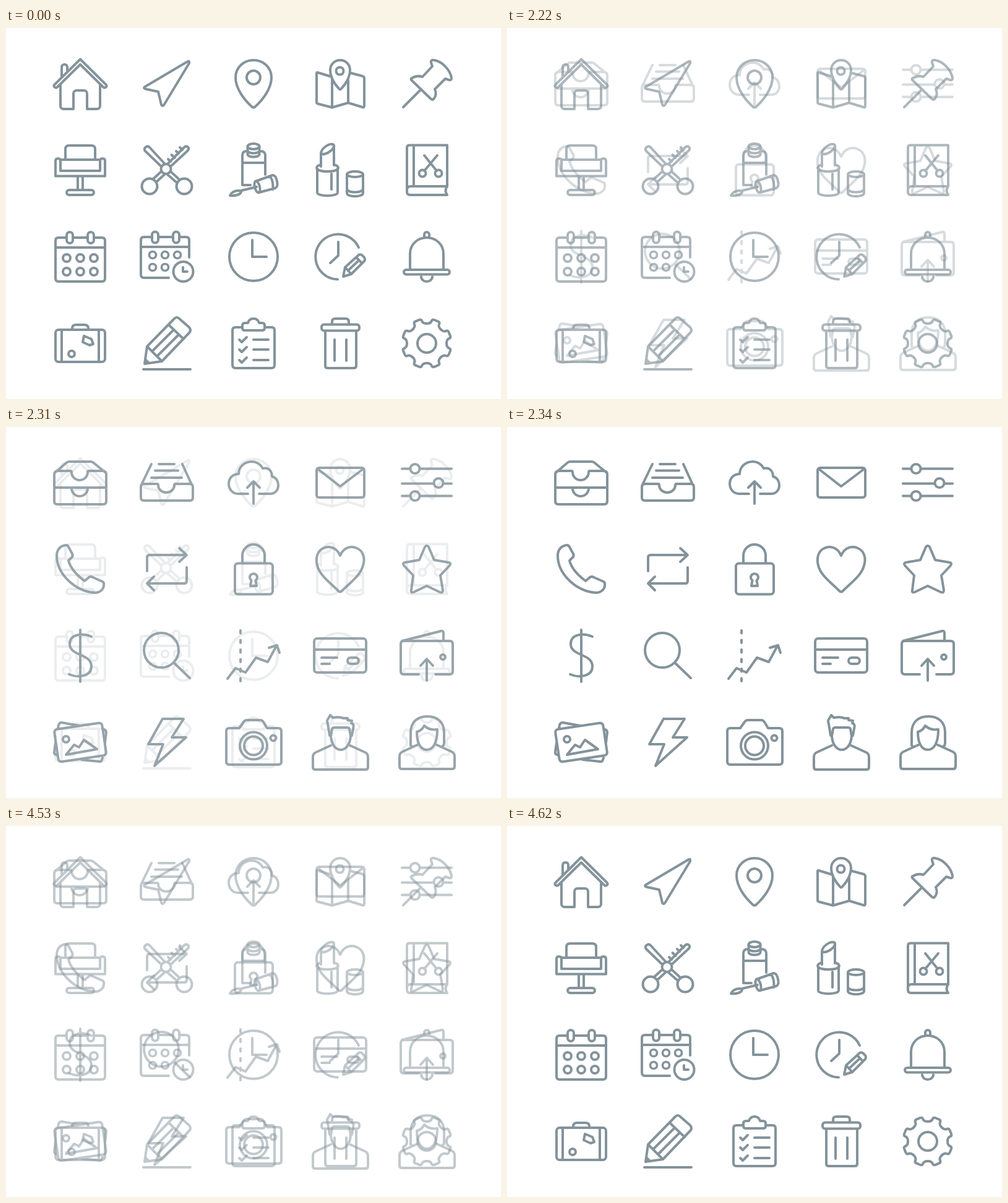
Animation, 800 px wide and 600 px high, one loop 4800 ms. Source, as an HTML page without scripts:

```html
<!DOCTYPE html>
<html lang="en">
<head>
<meta charset="utf-8">
<title>Line icons</title>
<style>
html, body { margin: 0; width: 100%; height: 100%; overflow: hidden; background: #fff; }
svg { display: block; width: 100%; height: 100%; fill: none; stroke: #84939b; stroke-width: 4; stroke-linecap: round; stroke-linejoin: round; }
.set { animation: fade-out 4.8s infinite; }
.alt { animation-name: fade-in; }
/* each crossfade runs in six hard steps of 30 ms */
@keyframes fade-out {
  0% { opacity: 1; animation-timing-function: step-end; }
  45.6% { opacity: 1; animation-timing-function: steps(6, start); }
  49.35% { opacity: 0; animation-timing-function: step-end; }
  93.1% { opacity: 0; animation-timing-function: steps(6, start); }
  96.85%, 100% { opacity: 1; }
}
@keyframes fade-in {
  0% { opacity: 0; animation-timing-function: step-end; }
  45.6% { opacity: 0; animation-timing-function: steps(6, start); }
  49.35% { opacity: 1; animation-timing-function: step-end; }
  93.1% { opacity: 1; animation-timing-function: steps(6, start); }
  96.85%, 100% { opacity: 0; }
}
</style>
</head>
<body>
<svg viewBox="0 0 800 600">
<defs>
  <circle id="day" r="6"/>
  <circle id="knob" r="7.5"/>
  <rect id="ring" x="-5" y="-9" width="10" height="18" rx="5"/>
  <path id="task" d="M377 504l4 4 8-8M400 504h24"/>
  <path id="tooth" d="M0-32C4.5-32 7-33.5 8-36.5Q9-39 12-38L18.4-35.4Q21.2-33.9 20.2-31.5C18.7-28.6 19.4-25.8 22.6-22.6"/>
  <path id="bust" d="M525 515L501 526Q496 528 496 534V550q0 4 4 4H581q4 0 4-4V534q0-6-5-8L556 515"/>
</defs>

<g class="set">
  <!-- house -->
  <path d="M120 50.5L161.5 91.5Q164 94 161 96Q159 97.500 156.500 95L120 59L83.500 95Q81 97.500 79 96Q76 94 78.500 91.500Z"/>
  <path d="M88 92V126a5 5 0 0 0 5 5H109V106a5 5 0 0 1 5-5H126a5 5 0 0 1 5 5V131H147a5 5 0 0 0 5-5V92M90 79V63a4 4 0 0 1 4-4h1a4 4 0 0 1 4 4V69"/>
  <!-- arrow -->
  <path d="M293 54.5L224.5 95Q221.5 97 225 98.5L246 103L251 124Q253 128 255.5 124L296 57Q297 52 293 54.5Z"/>
  <!-- pin -->
  <path d="M400 52C416 52 429 64 429 80C429 98 415 116 403 127Q400 130 397 127C385 116 371 98 371 80C371 64 384 52 400 52Z"/>
  <circle cx="400" cy="80" r="11"/>
  <!-- map -->
  <path d="M540 52C549 52 556 59 556 68C556 79 549 91 542 98Q540 101 538 98C531 91 524 79 524 68C524 59 531 52 540 52Z"/>
  <circle cx="539.500" cy="69.500" r="6"/>
  <path d="M525 78.500L504 72Q502 71 502 73V120Q502 122 504 122.500L527 128.500L553 121L576 128Q579 129 579 126V81Q579 79 577 78L558 73M527 81V128M553 84V121"/>
  <!-- pushpin -->
  <path d="M642 128L671 99M687 56Q686 51 692 52C705 54 718 68 720 81Q720 85 716 84L710 82L693 99Q697 108 691 115Q689 117 686 114L656 85Q653 82 656 81Q664 76 673 79L689 62Z"/>
  <!-- chair -->
  <path d="M80 239.500H160V215q0-4-4-4q-4 0-4 4V231H88V215q0-4-4-4q-4 0-4 4ZM88 213H152M96 213V196q0-6 6-6H138q6 0 6 6V213M116 240V262M124 240V262"/>
  <rect x="98" y="262" width="44" height="8" rx="4"/>
  <!-- scissors and comb -->
  <circle cx="232" cy="256" r="12.500"/><circle cx="288" cy="256" r="12.500"/><circle cx="258.500" cy="228" r="8"/>
  <path d="M251 224L225 199Q222 195 226 192.500Q229 190 232 193L256 219M266 224L293 199Q297 195 294 192.500Q291 190 288 193L262 219"/>
  <path d="M251 232L238 244M256 237L243 249M266 232L280 245M261 237L276 250M266 216l-4-4M272.500 210l-5-5M279 203l-4-4M285 197l-4-4"/>
  <!-- nail polish -->
  <ellipse cx="400" cy="191.500" rx="9.500" ry="4.500"/>
  <path d="M390.500 192V204c0 6 19 6 19 0V192M390.500 198c0 6 19 6 19 0M390 199q-8 0-8 7V254H395M410 199q9 0 9 7V237M382 218H419"/>
  <path d="M362 271Q366 263 376 263Q382 263 379 267Q374 272 362 271ZM380 263L405 257M403 248L431 238q5 0 7 10q2 9-3 11L409 266M427 240q6 9 4 21"/>
  <ellipse cx="406" cy="257" rx="4" ry="9.500" transform="rotate(-15 406 257)"/>
  <!-- lipstick -->
  <path d="M509 224V203C509 195 522 186 528 188Q531 189 530 194V222M510 204C518 205 530 197 530 190M503 228V266c0 7 33 7 33 0V228M526 236V261"/>
  <path d="M509 221C501 223 501 227 504 229C510 233 529 233 535 229C538 227 538 223 530 221"/>
  <ellipse cx="564" cy="236.500" rx="13" ry="4.500"/>
  <path d="M551 237V267c0 7 26 7 26 0V237M551 261c3 6 23 6 26 0"/>
  <!-- book -->
  <path d="M713 256V189.500H652q-4 0-4 4V265q0 5 5 5H713q-5-7 0-14H654q-6 0-6 6M659 190V255M676 206L696 231M697 206L676 231"/>
  <circle cx="673" cy="235" r="5.500"/><circle cx="699" cy="235" r="5.500"/>
  <!-- calendar -->
  <path d="M98 339H85q-5 0-5 5V405q0 5 5 5H155q5 0 5-5V344q0-5-5-5H142M108 339H132M80 355H160"/>
  <use href="#ring" x="103" y="339"/><use href="#ring" x="137" y="339"/>
  <use href="#day" x="98" y="372"/><use href="#day" x="120" y="372"/><use href="#day" x="142" y="372"/>
  <use href="#day" x="98" y="394"/><use href="#day" x="120" y="394"/><use href="#day" x="142" y="394"/>
  <!-- calendar with clock -->
  <path d="M236 338H223q-5 0-5 5V399q0 5 5 5H263M296 371V343q0-5-5-5H280M246 338H270M218 354H296M286 387V394H293"/>
  <use href="#ring" x="241" y="338.500"/><use href="#ring" x="275" y="338.500"/>
  <g id="days"><use href="#day" transform="translate(237 367) scale(.92)"/><use href="#day" transform="translate(257 367) scale(.92)"/></g>
  <use href="#days" y="20"/><use href="#day" transform="translate(277 367) scale(.92)"/>
  <circle cx="286.500" cy="394" r="16"/>
  <!-- clock -->
  <circle cx="400" cy="370" r="39"/><path d="M398 343V370H421"/>
  <!-- clock with pencil -->
  <path d="M536 406.500A36.500 36.500 0 1 1 570 355M537 346V368L524 380"/>
  <path d="M545 402L548 387L570 367q3-2 6 1l3 3q2 3 0 6L558 398ZM548 387L558 398M566 371L575 380M553 392L570 376"/>
  <!-- bell -->
  <path d="M653 391V365C653 350 665 339 680 339C695 339 707 350 707 365V391M676 339V334a4 4 0 0 1 8 0V339M671 402a9 8 0 0 0 18 0"/>
  <rect x="643" y="391" width="74" height="7.500" rx="3.700"/>
  <!-- suitcase -->
  <rect x="80" y="488" width="80" height="52" rx="5"/>
  <path d="M107 487V486q0-6 6-6H127q6 0 6 6V487M90 488V540M150 488V540M126 498L138 503L141 511L135 513L124 508Z"/>
  <circle cx="106" cy="527" r="5"/>
  <!-- pencil -->
  <path d="M222 552H298M224 543L228 515L272 470q4-4 8 0L296 484q4 5 0 9L252 539ZM228 515L252 539M263 480L287 503M236 523L271 488M244 531L279 496M225 536L231 542"/>
  <!-- clipboard -->
  <path d="M381 484H371q-5 0-5 5V545q0 5 5 5H429q5 0 5-5V489q0-5-5-5H419M382 485V481q0-4 4-4H391q2-7 9-7q7 0 9 7H414q4 0 4 4V485q0 4-4 4H386q-4 0-4-4Z"/>
  <use href="#task"/><use href="#task" y="16"/><use href="#task" y="33"/>
  <!-- bin -->
  <rect x="510" y="479.500" width="61" height="10" rx="4"/>
  <path d="M527 479V475q0-5 5-5H549q5 0 5 5V479M516 490V546q0 4 4 4H562q4 0 4-4V490M531 504V538M550 504V538"/>
  <!-- gear -->
  <g transform="translate(680 510)">
    <circle r="15"/>
    <g id="quarter"><use href="#tooth"/><use href="#tooth" transform="rotate(45)"/></g>
    <use href="#quarter" transform="rotate(90)"/><use href="#quarter" transform="rotate(180)"/><use href="#quarter" transform="rotate(270)"/>
  </g>
</g>

<g class="set alt">
  <!-- drawers -->
  <path d="M80 73L98 57.500q2-1.500 4-1.500H137q2 0 4 1.500L160 73M78 77q0-6 6-6H104q2 0 2 2a13 13 0 0 0 26 0q0-2 2-2H156q6 0 6 6V120q0 5-5 5H83q-5 0-5-5ZM78 98H162M106 99a13 13 0 0 0 26 0"/>
  <!-- inbox -->
  <path d="M235 60L219 93M285 60L300 93M247 60H272M241 70.500H278M235 82H284M223 92H244q2 0 2 2a13 12 0 0 0 26 0q0-2 2-2H297q5 0 5 5V114q0 5-5 5H223q-5 0-5-5V97q0-5 5-5Z"/>
  <!-- cloud upload -->
  <path d="M391 108H375C366 108 360 100 360 92C360 82 367 76 376 76C376 64 386 56 397 56C405 56 411 60 415 67C424 65 430 71 430 80C437 82 440 88 440 94C440 103 434 108 427 108H409M400 124V88M390 98L400 88L410 98"/>
  <!-- envelope -->
  <rect x="502" y="66" width="77" height="48" rx="4"/><path d="M504 68L540 96L577 68"/>
  <!-- sliders -->
  <path d="M640 67.500H653M669 67.500H720M640 91.500H691M707 91.500H720M640 111.500H653M669 111.500H720"/>
  <use href="#knob" x="661" y="67.500"/><use href="#knob" x="699" y="90.500"/><use href="#knob" x="661" y="111.500"/>
  <!-- phone -->
  <path d="M94 191.500Q99 190 101 194L107 205Q109 209 105 212L101 216C104 228 115 240 127 249L134 243Q137 241 140 243L156 250Q159 252 158 256C158 262 152 268 144 268C112 266 82 238 82 208C82 199 87 193 94 191.500Z"/>
  <!-- repeat -->
  <path d="M228 233V211q0-4 4-4H291M280 196L292 207L280 218M292 227V249q0 4-4 4H229M239 242L228 253L239 264"/>
  <!-- lock -->
  <rect x="370" y="220.500" width="61" height="50" rx="5"/>
  <path d="M382 219V208a18 18 0 0 1 36 0V219M396.500 248a6 6 0 1 1 7 0L405 257H395Z"/>
  <!-- heart -->
  <path d="M540 208C534 193 520 192 513 196C503 200 500 212 503 224C507 240 522 250 537 265Q540 268 543 265C558 250 573 240 577 224C581 212 577 200 567 196C560 192 546 193 540 208Z"/>
  <!-- star -->
  <path d="M677 194Q680 190 683 194L692 215L715 219Q720 220 717 224L702 240L706 264Q706 269 701 267L680 257L659 267Q654 269 655 264L658 240L643 224Q640 220 645 219L668 215Z"/>
  <!-- dollar -->
  <path d="M120 328V412M138 339C124 333 103 334 103 351C103 371 138 366 138 387C138 404 116 406 102 400"/>
  <!-- search -->
  <circle cx="251" cy="361" r="28"/><path d="M271 381L297 406"/>
  <!-- chart -->
  <path d="M379 329V412" stroke-dasharray="4.500 11"/>
  <path d="M358 407L371 390L387 397L404 373L423 380L437 354M425 357L438 353L442 365"/>
  <!-- card -->
  <rect x="498" y="342" width="84" height="55" rx="5"/><rect x="552" y="373" width="18" height="10" rx="5"/>
  <path d="M498 360H582M510 373H535M510 383H523"/>
  <!-- wallet -->
  <path d="M667 400H643q-5 0-5-5V351q0-5 5-5H717q5 0 5 5V395q0 5-5 5H694M640 346L703 330q4-1 4 3V345M680 410V376M670 386L680 375L690 386"/>
  <circle cx="706" cy="372" r="4"/>
  <!-- photos -->
  <rect x="81" y="483.500" width="78" height="53" rx="5" transform="rotate(-8.500 120 510)"/>
  <path d="M84 487L85 482Q86 478 90 478L118 483M158 489Q162 490 162 494L160 510M80 511L78 525Q77 529 81 530L83 531M122 538L150 541Q154 542 155 538L156 535M97 530L110 514L118 518L126 506L147 521Z"/>
  <circle cx="97" cy="505" r="5"/>
  <!-- bolt -->
  <path d="M253 472H287L268 502H291L240 548L254 513H230Z"/>
  <!-- camera -->
  <path d="M377 487L384 477q2-3 5-3H411q3 0 5 3L422 487H440q5 0 5 5V541q0 5-5 5H361q-5 0-5-5V492q0-5 5-5Z"/>
  <circle cx="400" cy="515.500" r="22"/><circle cx="400" cy="515.500" r="15"/><circle cx="432" cy="503" r="4.500"/>
  <!-- man -->
  <use href="#bust"/>
  <path d="M523 499L520 480Q518 474 520 473L524 466L528 470Q540 468 545 471L552 471L552 474L559 475L558 479Q563 480 561 488L559 499M525 500L527 488Q528 486 531 486H551Q554 486 555 488L557 500C556 514 549 522 541 522C533 522 526 514 525 500"/>
  <!-- woman -->
  <use href="#bust" x="140" y="-1"/>
  <path d="M657 517q-4-1-3-6V494C654 477 665 468 681 468C697 468 708 477 708 494V511q0 5-4 6M664 493C664 511 670 522 680 522C690 522 697 511 697 490M664 493Q672 491 676 483Q684 491 697 489"/>
</g>
</svg>
</body>
</html>
```
